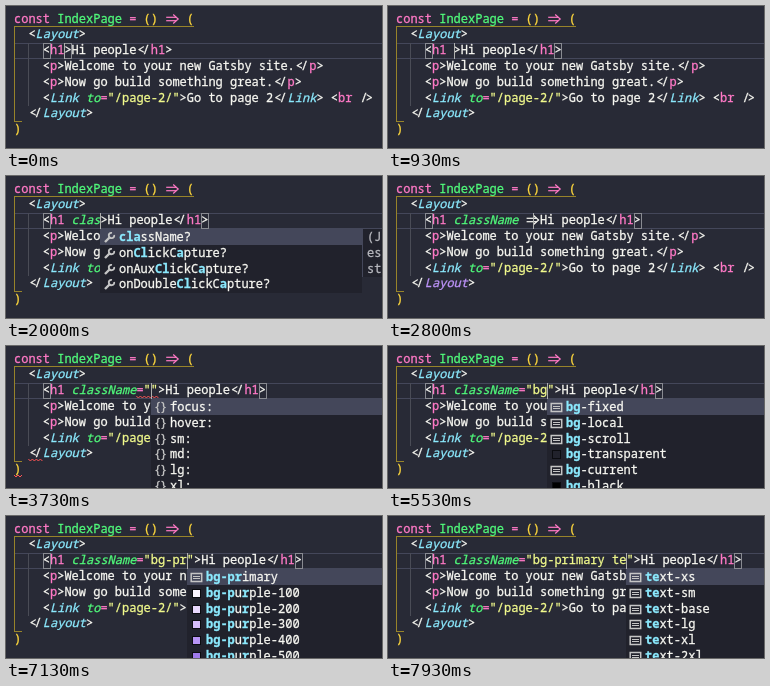
An HTML page with a canvas that plays this animation: 376x142 px, repeating every 8 s.

```html
<!DOCTYPE html>
<html lang="en">
<head>
<meta charset="utf-8">
<title>Typing classes in an editor</title>
<style>
html, body { margin: 0; width: 100%; height: 100%; overflow: hidden; background: #282a36; }
canvas { display: block; }
</style>
</head>
<body>
<canvas id="stage" width="376" height="142"></canvas>
<script>
const ctx = document.getElementById('stage').getContext('2d');
const LOOP = 8000, CHAR = 7.2, PITCH = 15.8, LEFT = 8, TAG_X = LEFT + 4 * CHAR;
const FONT = '12px "Noto Sans Mono", "DejaVu Sans Mono", monospace';
const WHITE = '#f8f8f2', PINK = '#ff79c6', GREEN = '#50fa7b', CYAN = '#8be9fd',
  YELLOW = '#f1fa8c', PURPLE = '#bd93f9', GOLD = '#ffd83d', SCOPE = '#97832a', GREY = '#44475a',
  CARET = '#aeafad', ICON = '#c5c5c5';

const rowTop = i => Math.round(5.4 + PITCH * i);
const baseline = i => Math.round(16.6 + PITCH * i);

// Suggestion lists: [label, icon]; an icon starting with # is a colour swatch
const withIcon = (icon, names) => names.split(' ').map(name => [name, icon]);
const bgList = [...withIcon('list', 'bg-fixed bg-local bg-scroll'),
  ['bg-transparent', '#21222c'], ['bg-current', 'list'], ['bg-black', '#000000']];
const purples = ['#faf5ff', '#e9d8fd', '#d6bcfa', '#b794f4', '#9f7aea'];
const lists = {
  props: withIcon('wrench', 'className? onClick? onClickCapture? color? children? onAuxClick?'),
  cla: withIcon('wrench', 'className? onClickCapture? onAuxClickCapture? onDoubleClickCapture?'),
  variants: withIcon('braces', 'focus: hover: sm: md: lg: xl:'),
  bg: bgList,
  primary: [['bg-primary', 'list'], ...purples.map((c, i) => [`bg-purple-${i + 1}00`, c])],
  text: withIcon('list', 'text-xs text-sm text-base text-lg text-xl text-2xl'),
};

// [start, text before the caret, suggestion list, query]
const CLASS = ' className', OPEN = CLASS + '="';
const steps = [
  [0, ''], [930, ' '], [1130, ' c'],
  [1470, ' cl', 'props', 'cl'], [1670, ' cla', 'props', 'cla'], [1735, ' cla', 'cla', 'cla'],
  [2000, ' clas', 'cla', 'cla'], [2070, CLASS],
  [2470, CLASS + ' '], [2670, CLASS + ' ='], [2930, CLASS + ' '], [3070, CLASS],
  [3270, CLASS + '='], [3470, OPEN], [3600, OPEN, 'variants', ''],
  [5270, OPEN + 'b', 'bg', 'b'], [5465, OPEN + 'bg', 'bg', 'bg'],
  [5800, OPEN + 'bg-', 'bg', 'bg-'], [6400, OPEN + 'bg-p', 'primary', 'bg-p'],
  [6530, OPEN + 'bg-pr', 'primary', 'bg-pr'], [7200, OPEN + 'bg-primary'],
  [7530, OPEN + 'bg-primary '], [7600, OPEN + 'bg-primary ', 'variants', ''],
  [7870, OPEN + 'bg-primary t', 'text', 't'], [7930, OPEN + 'bg-primary te', 'text', 'te'],
];

function rect(x, y, w, h, color) {
  ctx.fillStyle = color;
  ctx.fillRect(x, y, w, h);
}

function stroke(color, width, ...points) {
  ctx.strokeStyle = color;
  ctx.lineWidth = width;
  ctx.beginPath();
  points.forEach(([x, y], i) => i ? ctx.lineTo(x, y) : ctx.moveTo(x, y));
  ctx.stroke();
}

// A hairline outline gives the glyphs a medium weight
function text(str, x, y, color, style = '') {
  ctx.font = style + ' ' + FONT;
  ctx.fillStyle = ctx.strokeStyle = color;
  ctx.lineWidth = .3;
  ctx.fillText(str, x, y);
  ctx.strokeText(str, x, y);
}

function arrow(x, y, color) {
  const mid = y - 4;
  stroke(color, 1.2, [x + 1, mid - 1.7], [x + 11, mid - 1.7]);
  stroke(color, 1.2, [x + 1, mid + 1.7], [x + 11, mid + 1.7]);
  stroke(color, 1.2, [x + 8, mid - 4.5], [x + 13, mid], [x + 8, mid + 4.5]);
}

// Draws [string, colour, style] tokens on the character grid and joins the ligature pairs
function line(row, x, tokens) {
  const y = baseline(row);
  for (const [str, color, style] of tokens) {
    if (str === '=>') arrow(x, y, color);
    else if (str === '</' || str === '/>') {
      text(str[0], x + 1, y, color);
      text(str[1], x + CHAR - 1, y, color);
    } else text(str, x, y, color, style);
    x += str.length * CHAR;
  }
  return x;
}

const w = str => [str, WHITE];
const tag = (name, color = PINK, style) => [w('<'), [name, color, style], w('>')];
const close = (name, color = PINK, style) => [w('</'), [name, color, style], w('>')];
const para = str => [...tag('p'), w(str), ...close('p')];

function squiggle(x, y, width) {
  const points = [];
  for (let i = 0; i <= width; i += 2) points.push([x + i, y + (i % 4 ? 2 : 0)]);
  stroke('#ff5555', 1, ...points);
}

function box(x, row) {
  ctx.strokeStyle = '#888a91';
  ctx.lineWidth = 1;
  ctx.strokeRect(Math.round(x) + .5, rowTop(row) + .5, 7, 15);
}

function headingTokens(typed) {
  const [, name, sign = '', value] = typed.match(/^( ?\w* ?)(=?)(.*)$/);
  const tokens = [w('<'), ['h1', PINK], [name, GREEN, 'italic']];
  if (name.endsWith(' ') && sign) tokens.push(['=>', WHITE]);
  else {
    tokens.push([sign, PINK]);
    if (value) tokens.push([value + '"', YELLOW]);
    tokens.push(w('>'));
  }
  return [...tokens, w('Hi people'), ...close('h1')];
}

function icon(kind, x, y) {
  if (kind[0] === '#') {
    rect(x + 1, y - 4, 9, 9, '#0b0c10');
    rect(x + 2, y - 3, 7, 7, kind);
  } else if (kind === 'braces') {
    text('{', x - 1, y + 4, ICON);
    text('}', x + 5, y + 4, ICON);
  } else if (kind === 'list') {
    ctx.strokeStyle = ICON;
    ctx.lineWidth = 1.5;
    ctx.strokeRect(x + .2, y - 3.5, 10.5, 8);
    rect(x + 2, y - 1, 7, 1, ICON);
    rect(x + 2, y + 1, 7, 1, ICON);
  } else {
    stroke(ICON, 2.4, [x + 1, y + 5], [x + 6, y]);
    ctx.lineWidth = 1.8;
    ctx.beginPath();
    ctx.arc(x + 7.5, y - 1.5, 2.7, -.2, 4.9);
    ctx.stroke();
  }
}

function popup(left, name, query) {
  const items = lists[name], top = rowTop(3);
  const isProps = items[0][1] === 'wrench', right = isProps ? 356 : 376;
  rect(left, top, right - left, Math.ceil(items.length * PITCH), '#21222c');
  rect(left, top, right - left, 16, GREY);
  items.forEach(([label, kind], i) => {
    const y = baseline(i + 3) + 1;
    icon(kind, left + 4, y - 4);
    let found = 0;
    [...label].forEach((char, k) => {
      const hit = found < query.length && char.toLowerCase() === query[found];
      if (hit) found++;
      text(char, left + 19 + k * CHAR, y, hit ? CYAN : WHITE, hit ? 'bold' : '');
    });
  });
  if (isProps) {
    rect(356, top, 20, 48, '#21222c');
    rect(356, top, 1, 48, GREY);
    ['(JS', 'es<', 'sti'].forEach((s, i) => text(s, 361, baseline(i + 3) + 1, '#b9bac0'));
  }
}

function caretAlpha(t) {
  if (t >= 330 && t < 870) return 0;
  if (t >= 4270 && t < 4670) return Math.max(0, 1 - (t - 4270) / 200);
  if (t >= 4670 && t < 4870) return (t - 4670) / 200;
  return 1;
}

function draw(t) {
  const [, typed, list, query] = steps.findLast(s => s[0] <= t);
  const caret = TAG_X + (3 + typed.length) * CHAR;
  rect(0, 0, 376, 142, '#282a36');

  // Current line, indent guide and bracket scope
  rect(LEFT, rowTop(2), 368, 1, GREY);
  rect(LEFT, rowTop(3) - 1, 368, 1, GREY);
  rect(22, rowTop(2), 1, rowTop(6) - rowTop(2), '#4a4c56');
  rect(LEFT, 20, 25 * CHAR, 1, SCOPE);
  rect(LEFT, 20, 1, 96, SCOPE);
  rect(LEFT, 115, 8, 1, SCOPE);

  line(0, LEFT, [['const ', PINK], ['IndexPage', GREEN], [' = ', PINK], ['() ', GOLD],
    ['=>', PINK], [' (', GOLD]]);
  line(1, LEFT + 2 * CHAR, tag('Layout', CYAN, 'italic'));
  const end = line(2, TAG_X, headingTokens(typed));
  line(3, TAG_X, para('Welcome to your new Gatsby site.'));
  line(4, TAG_X, para('Now go build something great.'));
  line(5, TAG_X, [w('<'), ['Link', CYAN, 'italic'], [' to', GREEN, 'italic'], ['=', PINK],
    ['"/page-2/"', YELLOW], w('>Go to page 2'), ...close('Link', CYAN, 'italic'),
    w(' <'), ['br', PINK], w(' '), w('/>')]);
  const broken = t >= 2735 && t < 3000;
  line(6, LEFT + 2 * CHAR, close('Layout', broken ? PURPLE : CYAN, 'italic'));
  line(7, LEFT, [[')', GOLD]]);

  box(TAG_X, 2);
  box(typed ? end - CHAR : caret, 2);
  if (t >= 3400 && t < 3800) {
    squiggle(TAG_X + 13 * CHAR, 50, 22);
    squiggle(LEFT + 2 * CHAR, 113, 14);
    squiggle(LEFT, 129, 8);
  }
  if (list) popup(Math.round(caret), list, query);

  ctx.globalAlpha = caretAlpha(t);
  rect(Math.round(caret), rowTop(2), 1, 16, CARET);
  ctx.globalAlpha = 1;
}

function tick() {
  draw(performance.now() % LOOP);
  requestAnimationFrame(tick);
}
tick();
</script>
</body>
</html>
```
